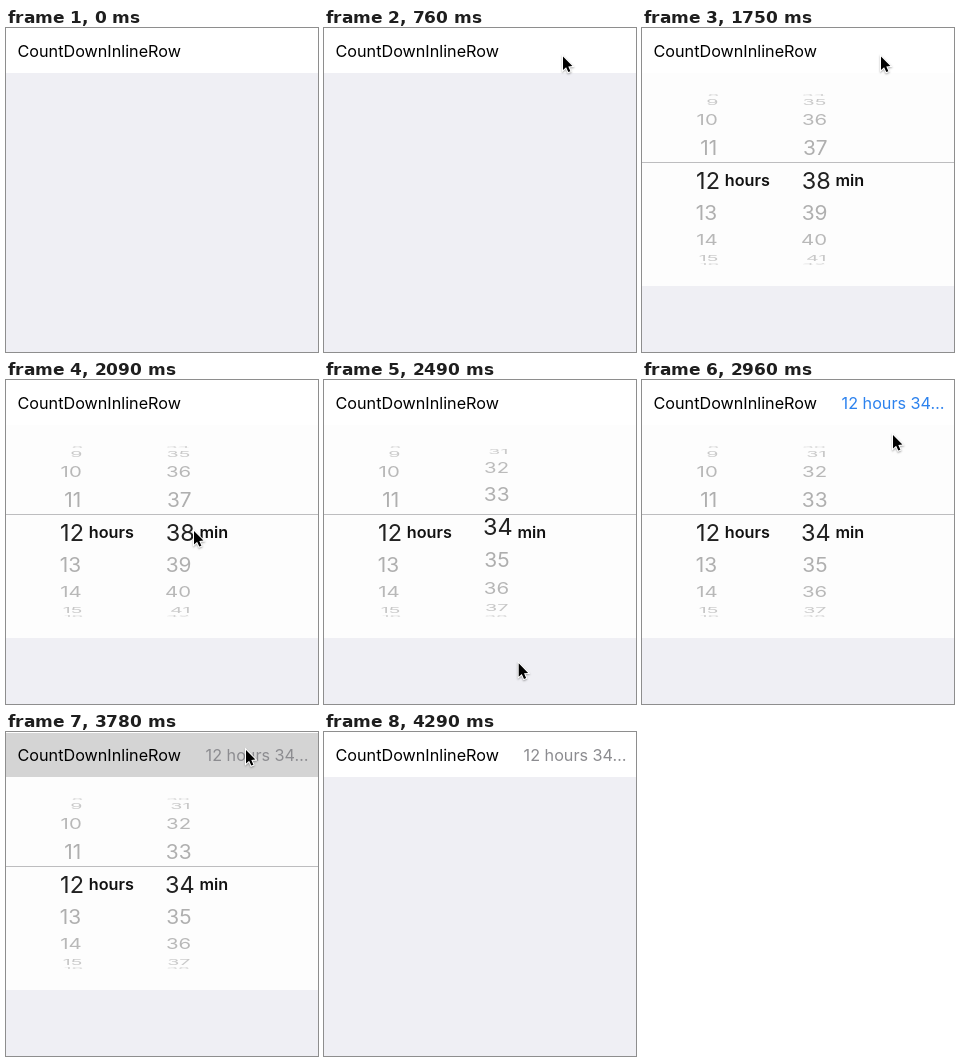
Animation of 312 by 324 pixels, one loop 5210 ms. Source, as an HTML page with a canvas:

```html
<!DOCTYPE html>
<html lang="en">
<head>
<meta charset="utf-8">
<title>Countdown row</title>
<style>
  html, body { margin: 0; width: 100%; height: 100%; overflow: hidden; background: #efeff4; }
  canvas { display: block; }
</style>
</head>
<body>
<canvas id="stage" width="312" height="324"></canvas>
<script>
const ctx = document.getElementById('stage').getContext('2d');
const LOOP = 5210;
const TAP_OPEN = 1000, TAP_CLOSE = 3780;
const ROW_H = 45, PICKER_H = 213;
const MID = 152;          // centre line of the wheels
const RADIUS = 84.6;      // wheel radius
const PITCH = 0.3945;     // angle between two numbers
const BAND_TOP = 135, BAND_END = 170;
const FONT = 'Inter, Roboto, sans-serif';

// Pointer legs: start, end, destination
const legs = [
  { from: 420, to: 760, x: 239, y: 28.5 },
  { from: 1750, to: 2090, x: 188, y: 151 },
  { from: 2090, to: 2547, x: 195, y: 289 },
  { from: 2680, to: 2957, x: 251, y: 55 },
  { from: 2957, to: 3360, x: 240, y: 18 },
  { from: 3950, to: 4290, x: 320, y: 112 }
];

const span = (t, a, b) => Math.min(1, Math.max(0, (t - a) / (b - a)));
const mix = (a, b, u) => a + (b - a) * u;
const smooth = u => u * u * (3 - 2 * u);
const easeOut = u => 1 - (1 - u) ** 2;

function hoursAt(t) {
  return 12 * easeOut(span(t, TAP_OPEN, 1330));
}

function minutesAt(t) {
  const settled = mix(62, 38, easeOut(span(t, TAP_OPEN, 1330)));
  return settled - 4 * smooth(span(t, 2090, 2547));
}

function opennessAt(t) {
  return easeOut(span(t, TAP_OPEN, 1200)) - smooth(span(t, TAP_CLOSE, 4063));
}

function pressAt(t) {
  if (t < TAP_OPEN) return 0;
  return t < TAP_CLOSE ? 1 - span(t, 1110, 1330) : 1 - span(t, 3840, 4170);
}

function box(color, y, h) {
  ctx.fillStyle = color;
  ctx.fillRect(0, y, 312, h);
}

function text(str, x, y, color, weight = 400, align = 'left') {
  ctx.font = `${weight} 16.2px ${FONT}`;
  ctx.textAlign = align;
  ctx.fillStyle = color;
  ctx.fillText(str, x, y);
}

function clipped(top, bottom, paint) {
  ctx.save();
  ctx.beginPath();
  ctx.rect(0, top, 312, bottom - top);
  ctx.clip();
  paint();
  ctx.restore();
}

function digits(pos, count, right, drift, focused) {
  const size = focused ? 23.5 : 21;
  const base = Math.round(pos);
  ctx.font = `400 ${size}px ${FONT}`;
  ctx.textAlign = 'right';
  ctx.fillStyle = focused ? '#222' : '#8e8e8e';
  for (let n = base - 4; n <= base + 4; n++) {
    const angle = (n - pos) * PITCH;
    if (Math.abs(angle) > 1.6) continue;
    const depth = Math.max(0.1, Math.cos(angle));
    ctx.save();
    ctx.translate(right + drift * (1 - depth) + (focused ? 3 : 0), MID + RADIUS * Math.sin(angle));
    ctx.scale(1 - 0.1 * (1 - depth), depth);
    if (!focused) ctx.globalAlpha *= 0.32 + 0.42 * depth;
    ctx.fillText((n + count) % count, 0, size * 0.364);
    ctx.restore();
  }
}

function wheels(t, focused) {
  digits(hoursAt(t), 24, 75, 2.5, focused);
  digits(minutesAt(t), 60, 185.7, -2, focused);
}

function picker(t) {
  const open = opennessAt(t);
  if (open <= 0) return;
  clipped(ROW_H, ROW_H + PICKER_H * open, () => {
    box('#fdfdfd', ROW_H, PICKER_H);
    ctx.globalAlpha = open;
    clipped(64, BAND_TOP, () => wheels(t, false));
    clipped(BAND_TOP, BAND_END, () => wheels(t, true));
    clipped(BAND_END, 238, () => wheels(t, false));
    box('#bdbdbf', BAND_TOP - 1, 1);
    text('hours', 82.8, 158.3, '#111', 600);
    text('min', 193.5, 158.3, '#111', 600);
  });
}

function row(t) {
  box('#fff', 0, ROW_H);
  ctx.globalAlpha = pressAt(t);
  box('#d4d4d4', 1, ROW_H - 1);
  ctx.globalAlpha = 1;
  text('CountDownInlineRow', 11.5, 29, '#000');
  if (t >= 2600) {
    text('12 hours 34…', 302.5, 29, t < TAP_CLOSE ? '#2c82ee' : '#8c8c90', 400, 'right');
  }
}

function cursor(t) {
  if (t < legs[0].from || t >= 4290) return;
  let x = 306, y = 44;
  for (const leg of legs) {
    const u = smooth(span(t, leg.from, leg.to));
    x = mix(x, leg.x, u);
    y = mix(y, leg.y, u);
  }
  const arrow = [[0, 0], [0, 13.5], [3.1, 10.7], [5.3, 15.6], [7.4, 14.7], [5.3, 9.9], [9.4, 9.6]];
  ctx.save();
  ctx.translate(x, y);
  ctx.beginPath();
  for (const [px, py] of arrow) ctx.lineTo(px, py);
  ctx.closePath();
  ctx.shadowColor = 'rgba(0,0,0,0.35)';
  ctx.shadowBlur = 2;
  ctx.shadowOffsetY = 1;
  ctx.lineWidth = 2;
  ctx.strokeStyle = '#fff';
  ctx.stroke();
  ctx.shadowColor = 'transparent';
  ctx.fillStyle = '#000';
  ctx.fill();
  ctx.restore();
}

function draw(t) {
  box('#efeff4', 0, 324);
  picker(t);
  row(t);
  cursor(t);
}

const start = performance.now();
function frame() {
  draw((performance.now() - start) % LOOP);
  requestAnimationFrame(frame);
}
frame();
</script>
</body>
</html>
```
